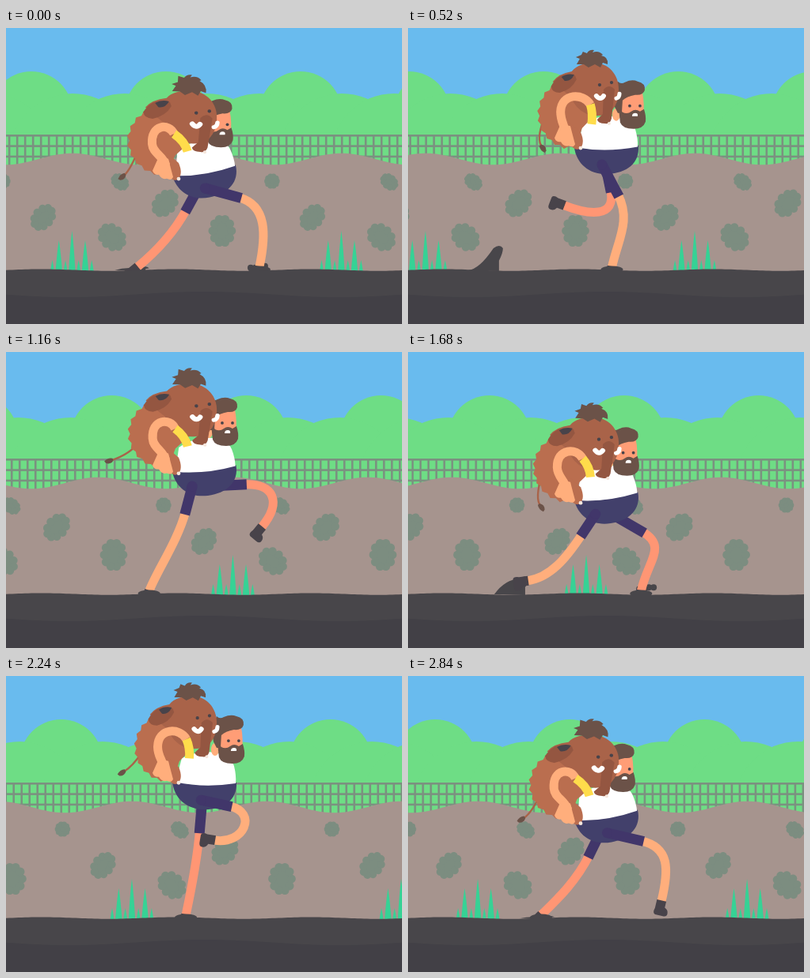
Recreate the animation shown at these times as an HTML page with a canvas. Size 500 by 375 pixels, loop 2880 ms.

```html
<!DOCTYPE html>
<html lang="en">
<head>
<meta charset="utf-8">
<title>Muddy walk</title>
<style>
html, body { margin: 0; width: 100%; height: 100%; overflow: hidden; background: #69bbee; }
canvas { display: block; width: 500px; height: 375px; }
</style>
</head>
<body>
<canvas id="stage" width="500" height="375"></canvas>
<script>
const ctx = document.getElementById('stage').getContext('2d');
const LOOP = 2880, STEP = LOOP / 2, TILE = 340, TAU = Math.PI * 2, DEG = Math.PI / 180;
const C = {
  sky: '#69bbee', trees: '#6edd85', fence: '#7b9180', wall: '#a6948e', bush: '#7c8d80',
  grass: '#36d295', road: '#48464a', deep: '#424046', shorts: '#42406b', pants: '#41366a',
  nearSkin: '#ffae7c', farSkin: '#ff9674', white: '#ffffff', nail: '#f5e6dc', hair: '#6b5248', face: '#ff9d76',
  fur: '#ba6e4f', head: '#a96349', trunk: '#945641', dark: '#48434a', yellow: '#ffdc4b'
};

const wrap = (t, period) => ((t % period) + period) % period;
// Cosine swing that peaks at the given time.
const swing = (t, peak, period) => Math.cos((t - peak) / period * TAU);
// Smooth rise from 0 to 1 between two times.
function ramp(from, to, t) {
  const u = Math.min(1, Math.max(0, (t - from) / (to - from)));
  return u * u * (3 - 2 * u);
}

function fill(color, d) {
  ctx.fillStyle = color;
  ctx.fill(new Path2D(d));
}
function line(color, width, d, cap = 'butt') {
  ctx.strokeStyle = color;
  ctx.lineWidth = width;
  ctx.lineCap = cap;
  ctx.stroke(new Path2D(d));
}
function oval(color, x, y, rx, ry = rx) {
  ctx.fillStyle = color;
  ctx.beginPath();
  ctx.ellipse(x, y, rx, ry, 0, 0, TAU);
  ctx.fill();
}
function group(draw, x, y, degrees = 0, px = 0, py = 0, sx = 1, sy = 1) {
  ctx.save();
  ctx.translate(x + px, y + py);
  ctx.rotate(degrees * DEG);
  ctx.scale(sx, sy);
  ctx.translate(-px, -py);
  draw();
  ctx.restore();
}
function hills(color, mid, amp, period, peak) {
  ctx.fillStyle = color;
  ctx.beginPath();
  ctx.moveTo(0, 375);
  for (let x = 0; x <= 500; x += 4) ctx.lineTo(x, mid - amp * swing(x, peak, period));
  ctx.lineTo(500, 375);
  ctx.fill();
}

function bush(x, y, size, stretch, angle) {
  const rx = 12 * size / stretch, ry = 12 * size * stretch;
  group(() => {
    oval(C.bush, 0, 0, rx + 1, ry + 1);
    for (let a = 0; a < 360; a += 36) oval(C.bush, Math.cos(a * DEG) * rx, Math.sin(a * DEG) * ry, 2 + 3 * size);
  }, x, y, angle);
}
function grass(x) {
  for (let i = -3; i <= 3; i++) {
    const tall = i % 2 === 0, h = tall ? 50 - 6 * Math.abs(i) : 13;
    const w = tall ? 4.2 : 2.4, c = x + 8.3 * i;
    fill(C.grass, `M${c - w} 308Q${c - w * 0.6} ${308 - h * 0.6} ${c} ${307 - h}Q${c + w * 0.6} ${308 - h * 0.6} ${c + w} 308Z`);
  }
}

function scenery(t) {
  const near = TILE * t / LOOP, far = near / 2;
  ctx.fillStyle = C.sky;
  ctx.fillRect(0, 0, 500, 375);
  ctx.fillStyle = C.trees;
  ctx.fillRect(0, 100, 500, 120);
  for (let x = 32 - far - 170; x < 760; x += 170) {
    oval(C.trees, x, 107, 52);
    oval(C.trees, x - 52, 163, 80);
    oval(C.trees, x + 52, 163, 80);
  }
  ctx.fillStyle = C.fence;
  for (let i = 0; i < 3; i++) ctx.fillRect(0, 135 + 13.3 * i, 500, 2.6);
  for (let x = 3 - near % 10 - 10; x < 500; x += 10) ctx.fillRect(x, 135, 2.6, 42);
  hills(C.wall, 166, 7.3, 170, 84 - near);
  for (let x = -TILE - near; x < 500; x += TILE) {
    bush(x + 47, 240, 0.97, 1.2, 40);
    bush(x + 134, 265, 1.07, 1.15, -48);
    bush(x + 144, 195, 0.6, 1.2, -50);
    bush(x + 201, 222, 1.02, 1.2, 42);
    bush(x + 273, 257, 1.13, 1.13, 0);
    bush(x + 336, 194, 0.52, 1, 0);
    grass(x + 83.5);
  }
}

function road() {
  hills(C.road, 306.6, 1.1, 170, 45);
  hills(C.deep, 337.5, 3.5, 340, 250);
}

// Mud sticks to the rear foot, stretches, then snaps back; the landing foot splashes.
function mud(t) {
  const p = wrap(t, STEP), m = wrap(t + 200, STEP);
  const snap = ramp(640, 880, m), h = 42 * Math.min(1, m / 600) ** 2 * (1 - snap);
  const x = 201 - TILE * m / LOOP, top = 307 - h;
  if (h > 0.5) {
    const bend = 306 - h * 0.8 * (1 - ramp(600, 720, m));
    fill(C.road, `M${x - 40} 307Q${x - 26} ${bend} ${x - 8} ${top + 3}Q${x} ${top - 3} ${x + 4} ${top + 3}` +
      `Q${x + 4} ${top + h * 0.3} ${x - 1} ${307 - h * 0.4}V308Z`);
  }
  const rise = 6 * Math.sin(Math.PI * (p + 60) / 500), c = 318 - p * 0.07;
  if (rise > 0 && p < 440) {
    for (let dx = -9; dx <= 9; dx += 6) oval(C.road, c + dx, 305 - rise - dx % 2, 4);
  }
}

// q is the time since this leg touched the ground.
function leg(q, drop, skin, shift) {
  const angle = DEG * (27.5 + 61.6 * swing(q, -166, LOOP) + 14.7 * swing(q, -431, STEP) + 9.8 * swing(q, 341, LOOP / 3));
  const length = 41 + 7 * swing(q, 160, LOOP);
  const ux = Math.sin(angle), uy = Math.cos(angle);
  const hx = 243 + 8.5 * swing(q, -100, LOOP) + shift, hy = 157 + drop;
  const kx = hx + ux * length, ky = hy + uy * length;

  const stance = q < 1200;
  const ax = shift * 0.4 + (stance ? 320 - 0.12 * q
    : 148 + 172 * ramp(1620, 2630, q) + 28 * Math.max(0, 1 - (q - 1200) / 500));
  const ay = 303 - 95 * ramp(1550, 2110, q) * (1 - Math.max(0, (q - 2290) / 590) ** 3);
  const turn = 12 + 106 * ramp(950, 2150, q) * (1 - ramp(2000, 2900, q));
  const reach = 34 + 8 * swing(q, -160, LOOP);
  const ex = ax + reach * Math.sin(turn * DEG), ey = ay - reach * Math.cos(turn * DEG);

  line(skin, 11, `M${kx - ux * 3} ${ky - uy * 3}C${kx + ux * 34} ${ky + uy * 34} ${ex} ${ey} ${ax} ${ay}`);
  group(() => fill(C.dark, 'M-6-1H6V7Q11 9 11 14Q11 18 6 18H-4Q-8 17-6 10Z'), ax, ay, turn);
  if (q < STEP) oval(C.road, ax, 306, 14, 4.5);
  line(C.pants, 13, `M${kx} ${ky}L${hx} ${hy}`);
  oval(C.pants, hx, hy, 6.5);
}

function manHead() {
  oval(C.nearSkin, 264, 94, 5, 8);
  fill(C.face, 'M268 66H297Q300 80 298 98H268Z');
  fill(C.hair, 'M262 84C260 70 262 62 266 52Q270 56 275 53Q284 49 291 52Q301 54 300 63Q298 70 288 69Q277 71 272 76L271 92H266Z');
  fill(C.hair, 'M267 85L272 91Q278 94 283 90Q288 86 294 90L299 87Q302 96 301 103Q298 112 286 112Q272 112 269 104Z');
  fill(C.white, 'M284 96Q284 92 288 92Q292 92 291 96Z');
  oval(C.dark, 281, 83, 1.9);
  oval(C.dark, 294, 83, 1.9);
}

function animal(lift) {
  let back = 'M235 92';
  for (let i = 0; i <= 20; i++) {
    const a = (265 - i * 8) * DEG, r = i % 2 ? 42.5 : 45.5;
    back += `L${209 + r * Math.cos(a)} ${90 + r * Math.sin(a)}`;
  }
  fill(C.fur, back + 'L215 125L220 108Z');
  fill(C.head, 'M183 49Q190 39 207 36C213 28 224 25 237 25C257 27 267 44 266 61Q266 75 258 85Q245 96 226 90Q211 83 206 68Q198 62 183 49Z');
  fill(C.trunk, 'M211 41C197 37 187 43 181 55Q182 63 192 63Q207 59 213 46Z');
  fill(C.dark, 'M194 43Q201 38 210 40Q206 49 198 48Z');
  fill(C.trunk, 'M247 59Q254 51 261 59L257 96Q255 103 249 102Q240 102 239 97L246 90Z');
  oval(C.dark, 242, 53, 2.1);
  oval(C.dark, 257, 50, 2.1);
  line(C.white, 6, 'M238 67Q243 73 247 67', 'round');
  line(C.white, 5, 'M263 70Q267 69 267 64', 'round');
  oval(C.nail, 254, 102, 2);
  const tip = 9 - 4 * lift;
  fill(C.hair, `M213 27L217 20L212 18L219 15L${221 - 2 * lift} ${tip + 2}L226 ${tip + 4}Q229 ${tip - 1} 235 ${tip}L233 ${tip + 3}` +
    `Q241 ${tip} 246 ${tip + 6}L244 ${tip + 7}Q253 17 252 27L246 25L243 31L236 27L228 31L222 27Z`);
}

function arm(lift) {
  const p = (x, y, dx, dy) => `${x + dx * lift} ${y + dy * lift}`;
  group(() => {
    fill(C.fur, 'M203 101L218 114Q224 128 217 135Q211 138 205 130Z');
    oval(C.nail, 218, 134, 2.4);
  }, 4 * lift, 6 * lift);
  const top = p(231, 79, -16, 4);
  line(C.nearSkin, 11, `M${top}C${p(222, 64, -13, 5)} ${p(194, 64, -8, 7)} ${p(193, 88, -5, 8)}` +
    `C${p(193, 102, -4, 6)} ${p(199, 106, 3, 4)} ${p(199, 118, 7, 5)}`);
  group(() => fill(C.nearSkin, 'M193 103L185 121Q187 127 193 126Q197 133 203 131Q209 134 211 129Q208 118 205 106Z'), 4 * lift, 9 * lift);
  line(C.yellow, 11, `M${top}Q${p(234, 90, -5, 2)} ${p(232, 104, 1, 1)}`);
}

function figure(t) {
  const drop = 22.5 + 26.3 * swing(t, 135, STEP) + 3.7 * swing(t, 135, STEP / 2);
  const low = drop * 1.2;
  const lift = (1 + swing(t, -110, STEP)) / 2;
  const tilt = -5.5 * (1 + swing(t, 20, STEP));
  const nod = ((1 + swing(t, 0, STEP)) / 2) ** 1.5;
  const onBelt = (color, d) => group(() => fill(color, d), 0, drop, tilt, 252, 137);

  leg(wrap(t + STEP, LOOP), drop, C.farSkin, 8);
  onBelt(C.shorts, 'M210 133Q250 142 291 135C292 157 275 169 251 169C228 169 212 155 210 133Z');
  leg(t, drop, C.nearSkin, 0);
  onBelt(C.white, 'M214 134L222 104C248 90 282 95 288 114Q291 126 290 136Q250 142 214 134Z');
  group(manHead, -14.5 * nod, drop - 7 * lift);

  const baseX = 171 - 4 * lift, baseY = 98 + low;
  const tipX = 152 + 20 * swing(t, 400, STEP), tipY = baseY + 30 + 9 * swing(t, 250, STEP);
  line(C.head, 2.4, `M${baseX} ${baseY}Q${baseX - 9} ${tipY - 9} ${tipX} ${tipY}`);
  group(() => fill(C.hair, 'M-3-1Q2-5 7-1L8 2Q2 5-3 2Z'), tipX, tipY, Math.atan2(9, tipX - baseX + 9) / DEG);

  group(() => animal(lift), -2 * lift, low, 3 * lift, 250, 70, 1 + 0.1 * lift);
  group(() => arm(lift), -4 * lift, drop * 1.12);
}

function draw(t) {
  scenery(t);
  mud(t);
  figure(t);
  road();
}
const start = performance.now();
function tick() {
  draw((performance.now() - start) % LOOP);
  requestAnimationFrame(tick);
}
tick();
</script>
</body>
</html>
```
